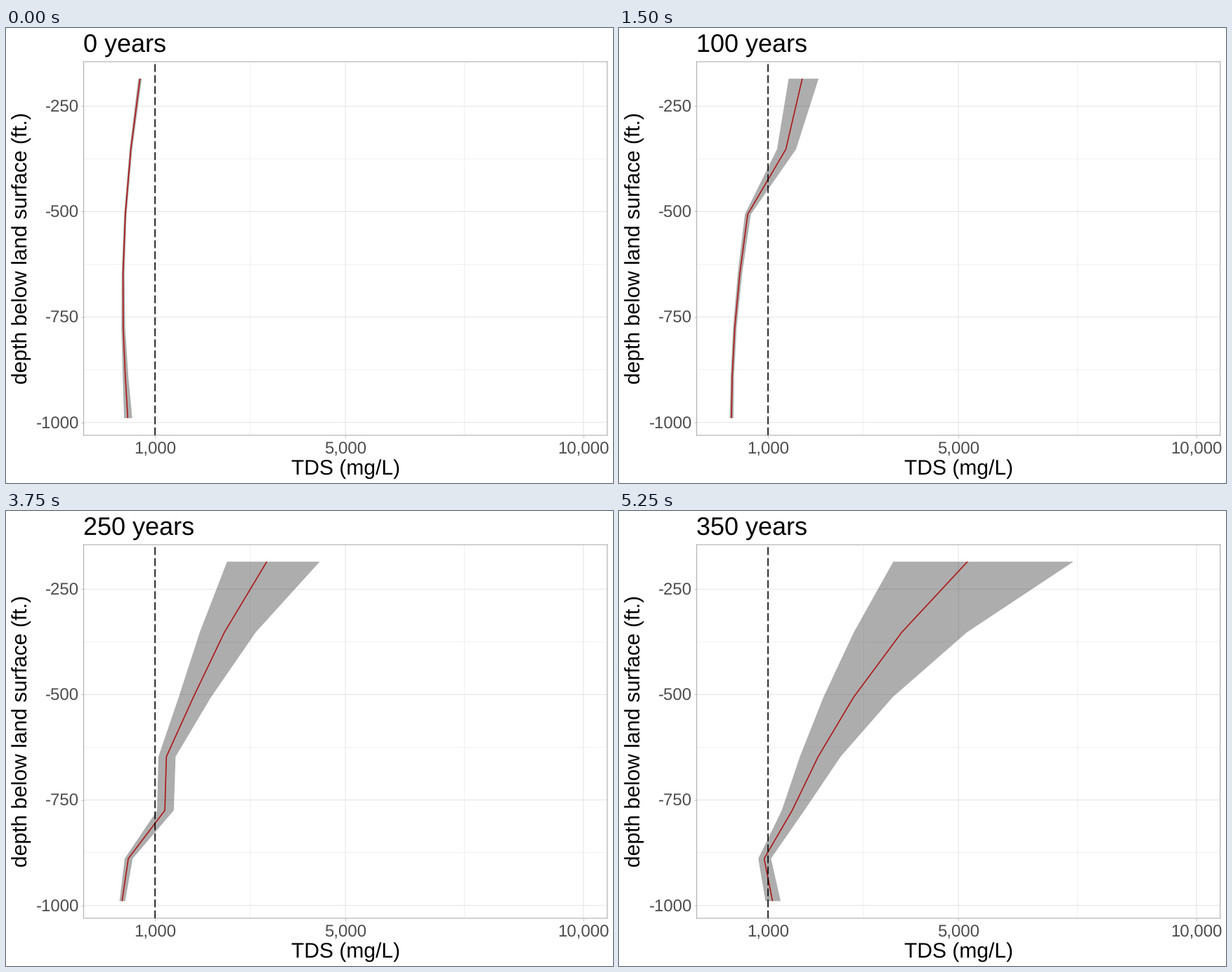
These frames come from a looping animation (864x648 px, 6.25 s). A matplotlib script:

```python
import matplotlib.pyplot as plt
import numpy as np
from matplotlib.animation import FuncAnimation
from matplotlib.patches import Polygon

WIDTH, HEIGHT, DPI = 864, 648, 108
PX = 72 / DPI  # points per pixel
LEFT, TOP, RIGHT, BOTTOM = 110.5, 48, 855.75, 580
GRID, FRAME, TICK_TEXT = "#dedede", "#b3b3b3", "#4d4d4d"

plt.rcParams.update({"font.family": "Liberation Sans", "text.hinting": "none"})

STEPS, YEARS_PER_STEP = 8, 50
LAYER = np.arange(7)
DEPTH = -185 - 174 * LAYER + 6.65 * LAYER**2
INITIAL_TDS = np.array([684, 492, 376, 328, 331, 375, 427])


def tds_bounds(step):
    """Lower bound, median and upper bound of TDS (mg/L) in every layer.

    A salty front sinks one layer per step. Behind it TDS grows exponentially;
    ahead of it the initial profile drifts down and is diluted.
    """
    lag = step - LAYER - 1
    source = np.clip(LAYER - step, 0, None)
    diluted = INITIAL_TDS[source] * (0.915 - 0.005 * source**2) ** step
    median = np.select(
        [lag < 0, lag == 0, lag == 1],
        [diluted, 1430 - 56 * LAYER, 1719 - 160 * LAYER],
        2160 * 1.245 ** (lag - 2.0) * 0.914**LAYER,
    )
    spread = np.where(
        lag < 0,
        0.055 + 0.027 * step + 0.004 * source**2,
        np.maximum(0.145, 0.147 + 0.035 * lag - 0.015 * LAYER),
    )
    return median * np.exp(-spread), median, median * np.exp(spread)


def label(x, y, text, size, **style):
    """Text with its baseline at a pixel position measured from the top left."""
    style = {"va": "baseline", "color": "black", **style}
    return fig.text(x / WIDTH, 1 - y / HEIGHT, text, fontsize=size * PX, **style)


def to_pixel(tds, depth):
    x, y = ax.transData.transform((tds, depth))
    return x, HEIGHT - y


def style_axes():
    ax.set(xlim=(-500, 10500), ylim=(-1030.25, -144.75))
    ax.set_xticks([1000, 5000, 10000])
    ax.set_xticks([3000, 7500], minor=True)
    ax.set_yticks([-250, -500, -750, -1000])
    ax.set_yticks([-375, -625, -875], minor=True)
    ax.set_axisbelow(True)
    ax.grid(which="major", color=GRID, linewidth=0.8 * PX, snap=False)
    ax.grid(which="minor", color=GRID, linewidth=0.4 * PX, snap=False)
    ax.tick_params(which="major", length=4.1 * PX, width=0.8 * PX, color=FRAME,
                   labelbottom=False, labelleft=False)
    ax.tick_params(which="minor", length=0)
    for spine in ax.spines.values():
        spine.set(color=FRAME, linewidth=1.2 * PX, snap=False)


def add_labels():
    for tds in ax.get_xticks():
        label(to_pixel(tds, 0)[0], 606, f"{tds:,.0f}", 24, ha="center", color=TICK_TEXT)
    for depth in ax.get_yticks():
        label(104, to_pixel(0, depth)[1] + 8.6, f"{depth:.0f}", 24,
              ha="right", color=TICK_TEXT)
    label((LEFT + RIGHT) / 2, 636, "TDS (mg/L)", 30, ha="center")
    label(30, (TOP + BOTTOM) / 2, "depth below land surface (ft.)", 30,
          ha="center", rotation=90, rotation_mode="anchor")


fig = plt.figure(figsize=(WIDTH / DPI, HEIGHT / DPI), dpi=DPI, facecolor="white")
ax = fig.add_axes([LEFT / WIDTH, 1 - BOTTOM / HEIGHT,
                   (RIGHT - LEFT) / WIDTH, (BOTTOM - TOP) / HEIGHT])
style_axes()
add_labels()
title = label(LEFT, 34, "", 36, ha="left")

line, = ax.plot([], [], color="red", linewidth=1.6 * PX, zorder=2,
                solid_capstyle="butt")
ribbon = ax.add_patch(Polygon(np.zeros((3, 2)), facecolor="#333333", alpha=0.4,
                              linewidth=0, zorder=3))
ax.plot([1000, 1000], ax.get_ylim(), color="black", linewidth=1.6 * PX, zorder=4,
        linestyle=(0, (6.88, 2.92)), dash_capstyle="butt", snap=False)


def update(frame):
    # Three ticks per step; the last step holds one tick longer.
    step = min(frame // 3, STEPS - 1)
    lower, median, upper = tds_bounds(step)
    title.set_text(f"{step * YEARS_PER_STEP} years")
    line.set_data(median, DEPTH)
    ribbon.set_xy(np.column_stack([np.append(lower, upper[::-1]),
                                   np.append(DEPTH, DEPTH[::-1])]))
    return title, line, ribbon


animation = FuncAnimation(fig, update, frames=25, interval=250, repeat=True,
                          repeat_delay=0, blit=False)
plt.show()
```
